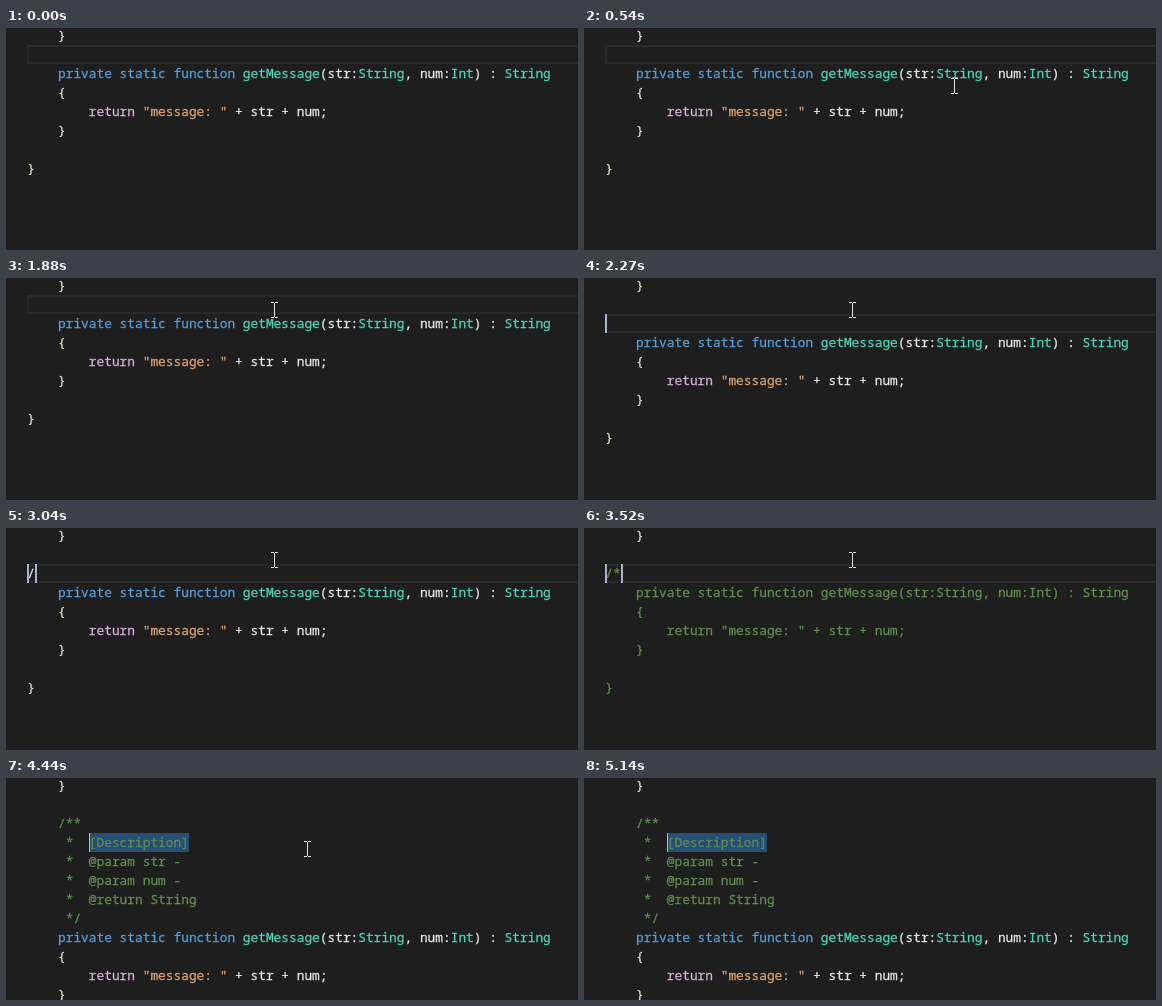
Animation of 572 by 222 pixels, one loop 6230 ms. Source, as an HTML page with a canvas:

```html
<!DOCTYPE html>
<html lang="en">
<head>
<meta charset="utf-8">
<title>Doc comment completion</title>
<style>
html, body { margin: 0; width: 100%; height: 100%; overflow: hidden; background: #1e1e1e; }
canvas { display: block; }
</style>
</head>
<body>
<canvas id="stage" width="572" height="222"></canvas>
<script>
const ctx = document.getElementById('stage').getContext('2d');
const LOOP = 6230, LINE = 19, TOP = -2, LEFT = 21.2, CHAR = 7.7;
const GREEN = '#608b4e', PLAIN = '#e4e4e4', CARET = '#a8b4d0';

const method = [
  '    private static function getMessage(str:String, num:Int) : String',
  '    {',
  '        return "message: " + str + num;',
  '    }',
  '',
  '}'
];
const doc = [
  '    /**',
  '     *  [Description]',
  '     *  @param str -',
  '     *  @param num -',
  '     *  @return String',
  '     */'
];

// Pointer moves: first step, last step, number of steps, end position, smooth or even.
const moves = [
  [140, 230, 2, 398, 57],
  [380, 540, 3, 367, 50],
  [700, 1171, 7, 264, 21, true],
  [1250, 1250, 1, 265, 23],
  [1880, 1880, 1, 265, 24],
  [4360, 4520, 3, 315, 82],
  [4680, 4830, 3, 465, 268]
];

const colX = col => Math.round(LEFT + col * CHAR);
const lineY = row => TOP + row * LINE;

function rect(color, x, y, w, h) {
  ctx.fillStyle = color;
  ctx.fillRect(x, y, w, h);
}

function tokenColor(token) {
  if (token[0] === '"') return '#d9a273';
  if (/^(private|static|function)$/.test(token)) return '#569cd6';
  if (/^(getMessage|String|Int)$/.test(token)) return '#4ed2b6';
  if (/^[{}]$/.test(token)) return '#e2dec8';
  return token === 'return' ? '#d4aed6' : PLAIN;
}

// The thin outline gives the letters their slightly heavier weight.
function drawLines(lines, row, color) {
  ctx.lineWidth = 0.3;
  lines.forEach((line, i) => {
    const y = lineY(row + i) + 14;
    for (const { 0: token, index } of line.matchAll(/"[^"]*"|\w+|\S/g)) {
      ctx.fillStyle = ctx.strokeStyle = color || tokenColor(token);
      [...token].forEach((char, j) => {
        const x = LEFT + (index + j) * CHAR;
        ctx.fillText(char, x, y);
        ctx.strokeText(char, x, y);
      });
    }
  });
}

function drawCaret(col, row, color = CARET, width = 2) {
  rect(color, colX(col), lineY(row), width, LINE);
}

function drawCurrentLine(row) {
  ctx.strokeStyle = '#282828';
  ctx.lineWidth = 2;
  ctx.strokeRect(22, lineY(row) + 1, 560, LINE - 2);
}

function pointerAt(t) {
  let x = 474, y = 87;
  for (const [start, end, steps, toX, toY, smooth] of moves) {
    if (t < start) break;
    const step = t >= end ? steps : 1 + Math.floor((t - start) / (end - start) * (steps - 1));
    let p = step / steps;
    if (smooth) p = p * p * (3 - 2 * p);
    x += (toX - x) * p;
    y += (toY - y) * p;
  }
  return [Math.round(x), Math.round(y)];
}

function drawPointer(t) {
  if (t < moves[0][0]) return;
  const [x, y] = pointerAt(t);
  for (const dy of [0, 15]) {
    rect('#e4e4e4', x, y + dy, 3, 1);
    rect('#e4e4e4', x + 4, y + dy, 3, 1);
  }
  rect('#e4e4e4', x + 3, y + 1, 1, 14);
}

function drawEditor(t) {
  drawLines(['    }'], 0);
  if (t < 2270) {
    drawCurrentLine(1);
    drawLines(method, 2);
  } else if (t < 3660) {
    const typed = t < 3040 ? '' : t < 3520 ? '/' : '/*';
    const color = typed === '/*' ? GREEN : null;
    drawCurrentLine(2);
    drawLines([typed, ...method], 2, color);
    drawCaret(0, 2);
    if (typed) drawCaret(typed.length, 2);
  } else {
    rect('#264f78', colX(8), lineY(3), 100, LINE);
    drawLines(doc, 2, GREEN);
    drawLines(method, 8);
    const bright = t < 4200 || (t >= 4680 && t < 5140);
    if (bright) drawCaret(8, 3, '#c89cac');
    else drawCaret(8, 3, '#b4bcc4', 1);
  }
}

function frame() {
  const t = performance.now() % LOOP;
  rect('#1e1e1e', 0, 0, 572, 222);
  ctx.font = '12.83px "Noto Sans Mono", "DejaVu Sans Mono", monospace';
  drawEditor(t);
  drawPointer(t);
  requestAnimationFrame(frame);
}
frame();
</script>
</body>
</html>
```
